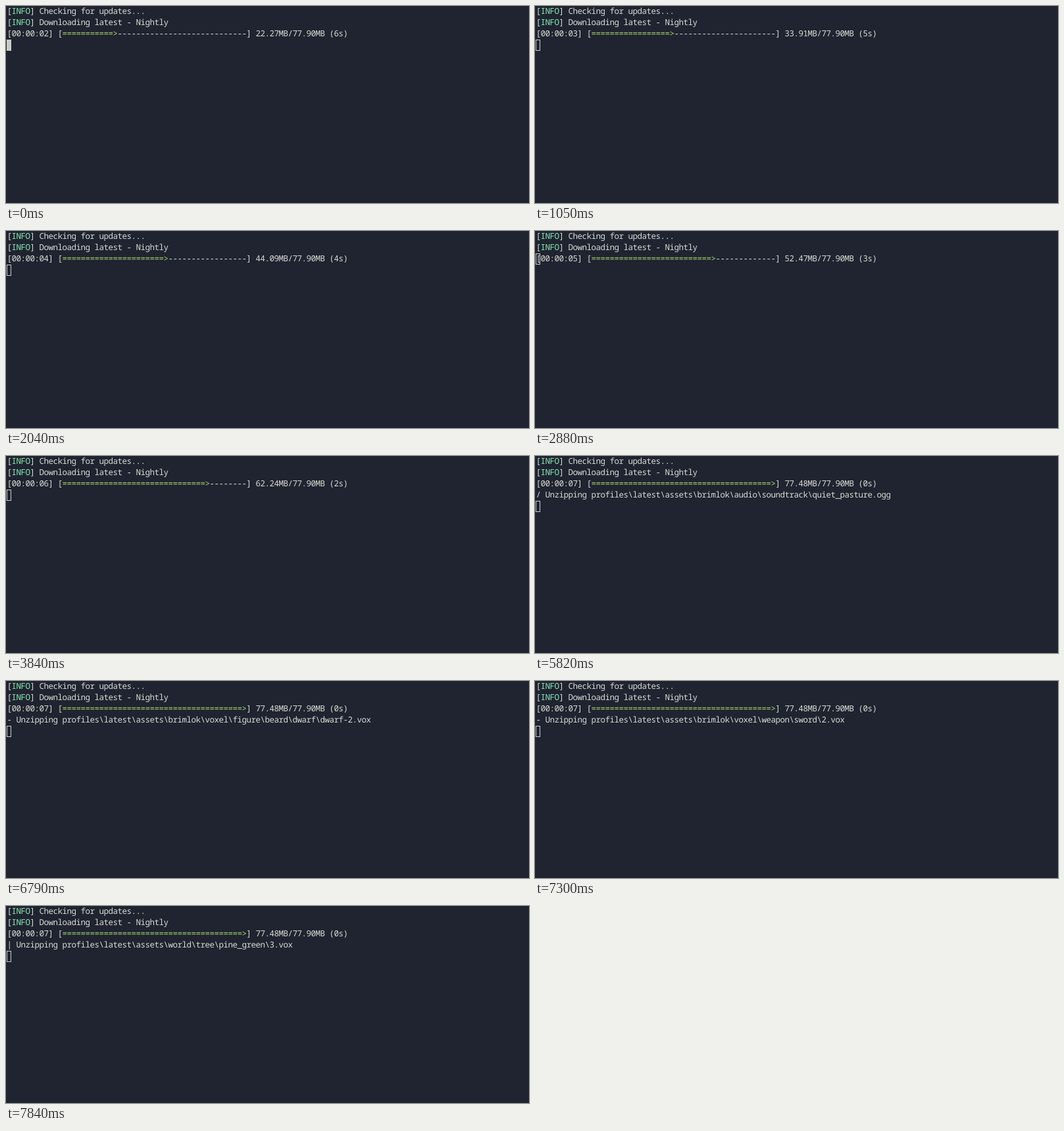
Write an HTML page that moves like this. It is 795 by 299 pixels and loops after 7.99 s.

```html
<!DOCTYPE html>
<html lang="en">
<head>
<meta charset="utf-8">
<title>Terminal update</title>
<style>
  html, body { margin: 0; width: 100%; height: 100%; overflow: hidden; background: #1f2430; }
  svg { display: block; width: 100%; height: 100%; }
  /* Glyphs are slightly wider than the 7px terminal cell */
  text {
    font: 500 12.5px "Noto Sans Mono", "DejaVu Sans Mono", monospace;
    letter-spacing: -0.5px;
    fill: #dadad4;
    white-space: pre;
    text-rendering: geometricPrecision;
    font-variant-ligatures: none;
  }
  .info { fill: #88e8b2; }
  .bar { fill: #acd872; }
</style>
</head>
<body>
<svg viewBox="0 0 795 299">
  <rect width="795" height="299" fill="#1f2430"/>
  <text x="1.4" y="12">[<tspan class="info">INFO</tspan>] Checking for updates...</text>
  <text x="1.4" y="29">[<tspan class="info">INFO</tspan>] Downloading latest - Nightly</text>
  <text x="1.4" y="46"><tspan id="clock"></tspan><tspan id="done" class="bar"></tspan><tspan id="rest"></tspan></text>
  <text id="unzip" x="1.4" y="63"></text>
  <rect id="cursor" x="1.5" width="6" height="16" stroke="#cbccc6"/>
</svg>
<script>
const LOOP = 7990, ROW = 17, TOTAL = 77.9, CELLS = 40;
const UNZIP_STEP = 40;
const $ = id => document.getElementById(id);

// Redraw times: bursts of eight, on a 30 ms grid
const bursts = [[120, 1050], [1170, 2190], [2340, 3300], [3420, 4380],
  [4500, 5430], [5550, 6520], [6640, 7570]];
const times = [0];
for (const [start, end] of bursts)
  for (let i = 0; i < 8; i++)
    times.push(start + Math.floor(i * (end - start) / 7 / 30) * 30);
times.push(7690, 7840);

// Downloaded megabytes by step
const progress = [[0, 22.27], [15, 44.09], [28, 62.24], [37, 72.27], [UNZIP_STEP, 77.48]];

const spinner = String.raw`|///-\|//--\|/-\|||`;
const track = String.raw`brimlok\audio\soundtrack` + "\\";
const figure = String.raw`brimlok\voxel\figure` + "\\";
const files = [
  String.raw`brimlok\audio\ambient\wind.ogg`,
  track + "morning_dew.ogg",
  track + "quiet_pasture.ogg",
  track + "quiet_pasture.ogg",
  track + "calm_river.ogg",
  track + "evening_by_a_lake.ogg",
  String.raw`brimlok\element\ui\map.png`,
  String.raw`brimlok\shaders\fluid.glsl`,
  String.raw`brimlok\voxel\armor\chest\3.vox`,
  figure + String.raw`beard\dwarf\dwarf-1.vox`,
  figure + String.raw`beard\dwarf\dwarf-2.vox`,
  figure + String.raw`eyes\orc\male-4.vox`,
  figure + String.raw`hair\human\female_long.vox`,
  String.raw`brimlok\voxel\npc\wolf\head.vox`,
  String.raw`brimlok\voxel\weapon\sword\2.vox`,
  String.raw`world\structure\cave\rock_3.vox`,
  String.raw`world\structure\dungeon\stone_arch_02.vox`,
  String.raw`world\tree\oak_green\5.vox`,
  String.raw`world\tree\pine_green\3.vox`
];

function loaded(step) {
  for (let i = 1; i < progress.length; i++) {
    const [a, from] = progress[i - 1], [b, to] = progress[i];
    if (step <= b) return from + (to - from) * (step - a) / (b - a);
  }
  return progress[progress.length - 1][1];
}

function drawBar(step) {
  const mb = loaded(step);
  const full = Math.floor(mb / TOTAL * CELLS);
  const secs = Math.min(7, Math.floor(2.3 + times[step] / 1000));
  const left = Math.max(0, Math.ceil((TOTAL - mb) / 10 - 0.1));
  $("clock").textContent = `[00:00:0${secs}] [`;
  $("done").textContent = "=".repeat(full) + ">";
  $("rest").textContent = "-".repeat(CELLS - 1 - full) +
    `] ${mb.toFixed(2)}MB/${TOTAL.toFixed(2)}MB (${left}s)`;
}

function drawUnzip(step) {
  const n = step - UNZIP_STEP;
  $("unzip").textContent = n < 0 ? "" :
    spinner[n] + " Unzipping profiles\\latest\\assets\\" + files[n];
}

function drawCursor(step) {
  const home = step < UNZIP_STEP ? 3 : 4;
  const row = step % 8 === 5 ? home - 1 : home;
  $("cursor").setAttribute("y", row * ROW + 0.5);
  $("cursor").setAttribute("fill", step === 0 ? "#cbccc6" : "none");
}

let shown = -1;
function render(ms) {
  const t = ms % LOOP;
  let step = times.length - 1;
  while (times[step] > t) step--;
  if (step === shown) return;
  shown = step;
  drawBar(step);
  drawUnzip(step);
  drawCursor(step);
}

const begin = performance.now();
function tick() {
  render(performance.now() - begin);
  requestAnimationFrame(tick);
}
tick();
</script>
</body>
</html>
```
